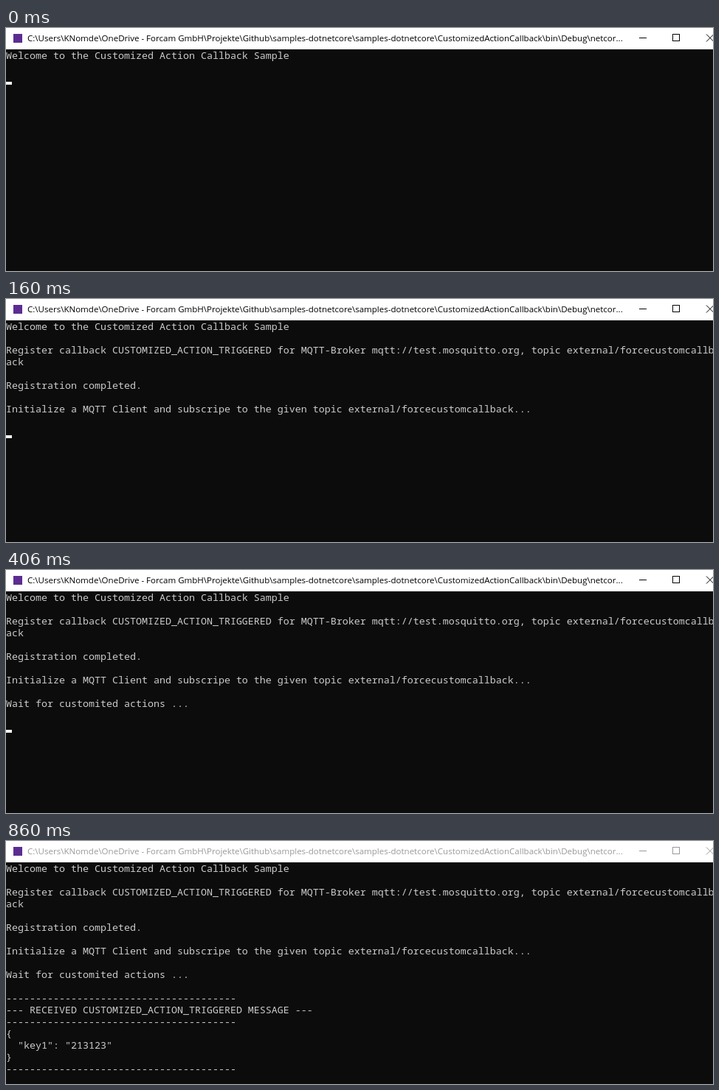
Write an HTML page with a canvas that moves like this. It is 958 px wide and 330 px high and loops after 1120 ms.

```html
<!DOCTYPE html>
<html lang="en">
<head>
<meta charset="utf-8">
<title>Callback sample console</title>
<style>
  html, body { margin: 0; width: 100%; height: 100%; overflow: hidden; background: #0c0c0c; }
  canvas { display: block; }
</style>
</head>
<body>
<canvas id="stage" width="958" height="330"></canvas>
<script>
const ctx = document.getElementById('stage').getContext('2d');

const LOOP = 1120;
const COLS = 120, CELL = 8, ROW = 16, TOP = 29;
const BLUR_AT = 470; // window loses focus
const TITLE = 'C:\\Users\\KNomde\\OneDrive - Forcam GmbH\\Projekte\\Github\\samples-dotnetcore' +
  '\\samples-dotnetcore\\CustomizedActionCallback\\bin\\Debug\\netcor...';
const RULE = '-'.repeat(39);

// Each step appends output; the cursor waits on the given row.
const steps = [
  { at: 0, cursor: 2, out: ['Welcome to the Customized Action Callback Sample', ''] },
  { at: 80, cursor: 4, out: ['Register callback CUSTOMIZED_ACTION_TRIGGERED for MQTT-Broker ' +
      'mqtt://test.mosquitto.org, topic external/forcecustomcallback'] },
  { at: 160, cursor: 9, out: ['', 'Registration completed.', '',
      'Initialize a MQTT Client and subscripe to the given topic external/forcecustomcallback...', ''] },
  { at: 310, cursor: 11, out: ['Wait for customited actions ...', ''] },
  { at: 470, cursor: null, out: [RULE, '--- RECEIVED CUSTOMIZED_ACTION_TRIGGERED MESSAGE ---', RULE,
      '{', '  "key1": "213123"', '}', RULE] }
];

function rect(color, x, y, w, h) {
  ctx.fillStyle = color;
  ctx.fillRect(x, y, w, h);
}

function wrap(line) {
  const rows = [];
  for (let i = 0; i === 0 || i < line.length; i += COLS) rows.push(line.slice(i, i + COLS));
  return rows;
}

function drawTitleBar(active) {
  const ink = active ? '#000' : '#999';
  rect('#fff', 0, 0, 958, TOP);
  rect('#5c2d91', 10, 8, 12, 12);

  ctx.font = '11.54px "Open Sans", "Noto Sans", sans-serif';
  ctx.fillStyle = ink;
  ctx.fillText(TITLE, 29, 18);

  rect(ink, 858, 13, 10, 1);
  ctx.strokeStyle = ink;
  ctx.lineWidth = 1;
  ctx.strokeRect(903.5, 8.5, 9, 9);
  ctx.beginPath();
  ctx.moveTo(949, 8.5);
  ctx.lineTo(959, 18.5);
  ctx.moveTo(959, 8.5);
  ctx.lineTo(949, 18.5);
  ctx.stroke();
}

function drawConsole(t) {
  const shown = steps.filter(s => s.at <= t);
  const { cursor } = shown[shown.length - 1];
  rect('#0c0c0c', 0, TOP, 958, 330 - TOP);

  ctx.font = '13.333px "Noto Sans Mono", "DejaVu Sans Mono", monospace';
  ctx.fillStyle = '#ccc';
  shown.flatMap(s => s.out).flatMap(wrap).forEach((row, i) => {
    ctx.fillText(row, 0, TOP + i * ROW + 13);
  });

  if (cursor !== null) rect('#f2f2f2', 0, TOP + (cursor + 1) * ROW - 4, CELL, 4);
}

const start = performance.now();

function draw(now) {
  const t = Math.max(0, now - start) % LOOP;
  drawConsole(t);
  drawTitleBar(t < BLUR_AT);
  requestAnimationFrame(draw);
}

draw(start);
</script>
</body>
</html>
```
